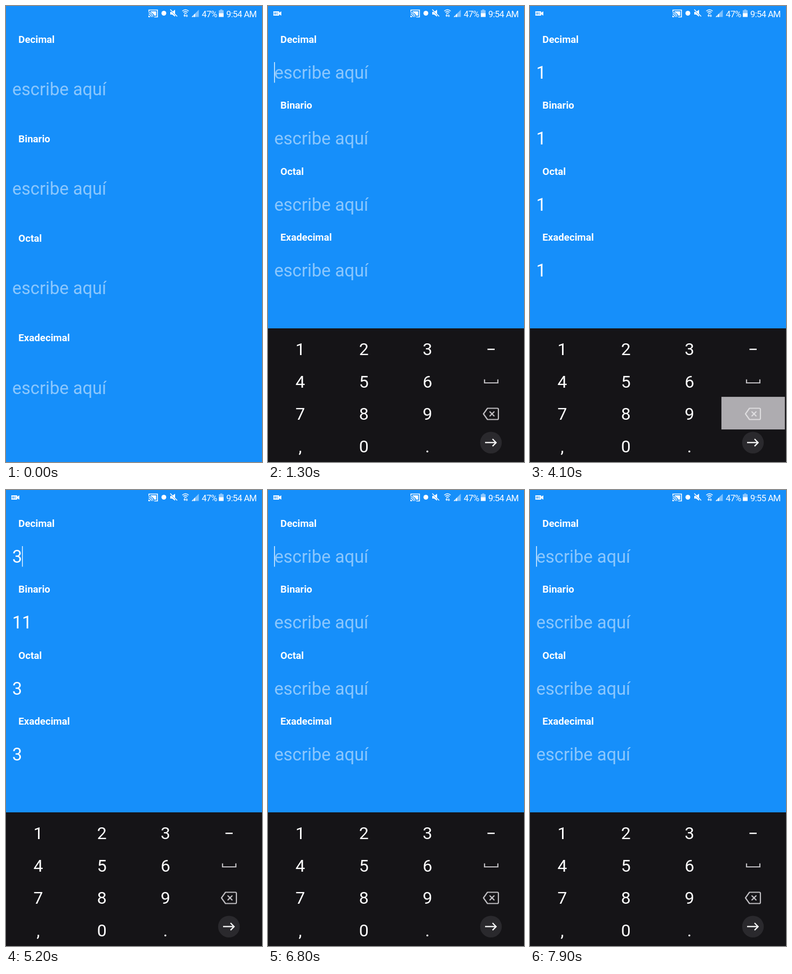
These frames come from a looping animation (480 px wide and 853 px high, 8 s). An HTML page:

```html
<!DOCTYPE html>
<html lang="es">
<head>
<meta charset="utf-8">
<style>
  html, body { margin: 0; height: 100%; overflow: hidden; background: #168ffa; }
  svg { display: block; width: 100vw; height: 100vh; font-family: Roboto, sans-serif; fill: #fff; }
  .label { font-size: 18.67px; font-weight: 700; }
  .value { font-size: 32.67px; }
  .hint { fill-opacity: .5; }
  .key { font-size: 32px; text-anchor: middle; }
  .status { font-size: 16.5px; letter-spacing: -.6px; }
  .line { fill: none; stroke: #fff; }
  .grey { fill: none; stroke: #c0bec2; stroke-width: 2.2; }
</style>
</head>
<body>
<svg viewBox="0 0 480 853" preserveAspectRatio="none">
  <g id="fields"></g>
  <rect id="caret" width="1.3" height="38.5" y="105"/>

  <g id="recorder">
    <path d="M10 10h11v2.5l4-2.5v8l-4-2.500v2.500h-11z"/>
    <text x="11" y="16.200" font-size="4.500" font-weight="700" fill="#168ffa">REC</text>
  </g>
  <g id="statusIcons">
    <path class="line" stroke-width="1.600" d="M268 11V7.500h16v13h-6"/>
    <path class="line" stroke-width="1.500" d="M267.500 12.500a8 8 0 0 1 8 8M267.500 15.500a5 5 0 0 1 5 5"/>
    <path d="M267 18a3 3 0 0 1 3 3h-3zM271 10h10.500v8H278a11 11 0 0 0-7-6.500z"/>
    <circle cx="296" cy="13.500" r="4.500"/>
    <path d="M308 11h3.500l5.500-4v13l-5.500-4H308z"/>
    <path stroke="#168ffa" stroke-width="1.500" d="M307 6.500l14 14"/>
    <path class="line" stroke-width="1.500" d="M308 6.500l13 13"/>
    <path class="line" stroke-width="1.500" d="M330.500 9.500q6-5 12 0M332.500 12q4-3.300 8 0M334.500 14.300q2-1.600 4 0"/>
    <path d="M333 17.500l2-2.500 2 2.500v1l-2 2-2-2zM338 16h2v2h1.500l-2.500 3-2.500-3h1.500z" opacity=".75"/>
    <path d="M348 20.500L361.500 7v13.500z" opacity=".45"/>
    <path d="M348 20.500l3-3v3zM352 16.500l2.500-2.500v6.500H352z"/>
    <path d="M401.500 6.500h4V8h2.500v6h-9V8h2.500z" opacity=".5"/>
    <path d="M399 13.500h9v7h-9z"/>
    <text class="status" x="367" y="20.500">47%</text>
    <text class="status" id="clock" x="413" y="20.500"></text>
  </g>

  <g id="keyboard">
    <rect y="603" width="480" height="250" fill="#151417"/>
    <rect id="pressed" width="119" height="61" fill="#aeacb0"/>
    <g id="keys"></g>
    <rect x="411.500" y="641" width="13.500" height="2.400"/>
    <path class="grey" d="M406 698.500v6.500h25v-6.500"/>
    <path class="grey" id="backspace" stroke-linejoin="round"
      d="M411.500 752.500H430q2 0 2 2v17q0 2-2 2H411.500L404 763zM415.500 758.500l9 9m0-9l-9 9"/>
    <circle cx="418" cy="816.700" r="20.300" fill="#2a292d"/>
    <path class="line" stroke-width="2.200" d="M407 816.700h20.500M421 810l6.700 6.700-6.700 6.700"/>
  </g>
</svg>
<script>
const LOOP = 8000, STEP = 100, BLINK = 480;
const $ = id => document.getElementById(id);

const bases = [['Decimal', 10], ['Binario', 2], ['Octal', 8], ['Exadecimal', 16]];

// [time, content of the decimal field]; every edit restarts the caret blink
const edits = [
  [300, ''], [2250, '0'], [3150, ''], [3310, '1'], [4190, ''], [5050, '3'],
  [5650, ''], [5950, '4'], [6350, ''], [7250, '7'], [7650, '']
];

// [down, up, column, row]
const presses = [
  [2300, 2500, 1, 3], [3000, 3200, 3, 2], [4000, 4300, 3, 2], [4900, 5200, 2, 0],
  [5600, 5700, 3, 2], [5900, 6000, 0, 1], [6300, 6500, 3, 2], [7200, 7400, 0, 2],
  [7600, 7800, 3, 2]
];

$('keys').innerHTML = ['123', '456', '789', ',0.'].map((row, r) =>
  [...row].map((key, c) =>
    `<text class="key" x="${60.5 + c * 119.2}" y="${653.2 + r * 60.6}">${key}</text>`
  ).join('')).join('');

$('fields').innerHTML = bases.map(([name]) =>
  `<text class="label" x="23.3">${name}</text><text class="value" x="11.67"></text>`).join('');
const texts = [...$('fields').children];

function drawFields(value, compact) {
  const pitch = compact ? 123.4 : 186.1;
  bases.forEach(([, base], i) => {
    const label = texts[2 * i], field = texts[2 * i + 1];
    const content = i === 0 ? value : +value ? (+value).toString(base).toUpperCase() : '';
    label.setAttribute('y', 69 + i * pitch);
    field.setAttribute('y', (compact ? 135.8 : 167.2) + i * pitch);
    field.textContent = content || 'escribe aquí';
    field.classList.toggle('hint', !content);
  });
}

function draw(now) {
  const t = Math.floor(now % LOOP / STEP) * STEP;
  const [since, value] = edits.findLast(([time]) => time <= t) || [Infinity, ''];
  const compact = t >= 500;
  drawFields(value, compact);

  const caretOn = t >= since && (t - since) % (2 * BLINK) < BLINK;
  $('caret').setAttribute('visibility', caretOn ? 'visible' : 'hidden');
  $('caret').setAttribute('x', 11.6 + value.length * 18.5);
  $('caret').setAttribute('y', compact ? 105 : 136.4);

  const slide = Math.min(1, Math.max(0, (t - 200) / 400));
  $('keyboard').setAttribute('transform', `translate(0 ${250 * (1 - slide) ** 2})`);

  const press = presses.find(([down, up]) => t >= down && t < up);
  $('pressed').setAttribute('visibility', press ? 'visible' : 'hidden');
  if (press) {
    $('pressed').setAttribute('x', 1 + press[2] * 119.3);
    $('pressed').setAttribute('y', 610.5 + press[3] * 60.3);
  }
  $('backspace').style.stroke = press && press[2] === 3 ? '#dddcde' : '';

  $('recorder').setAttribute('visibility', t >= 200 ? 'visible' : 'hidden');
  $('clock').textContent = t < 7200 ? '9:54 AM' : '9:55 AM';
}

const start = performance.now();
function tick() {
  draw(performance.now() - start);
  requestAnimationFrame(tick);
}
tick();
</script>
</body>
</html>
```
